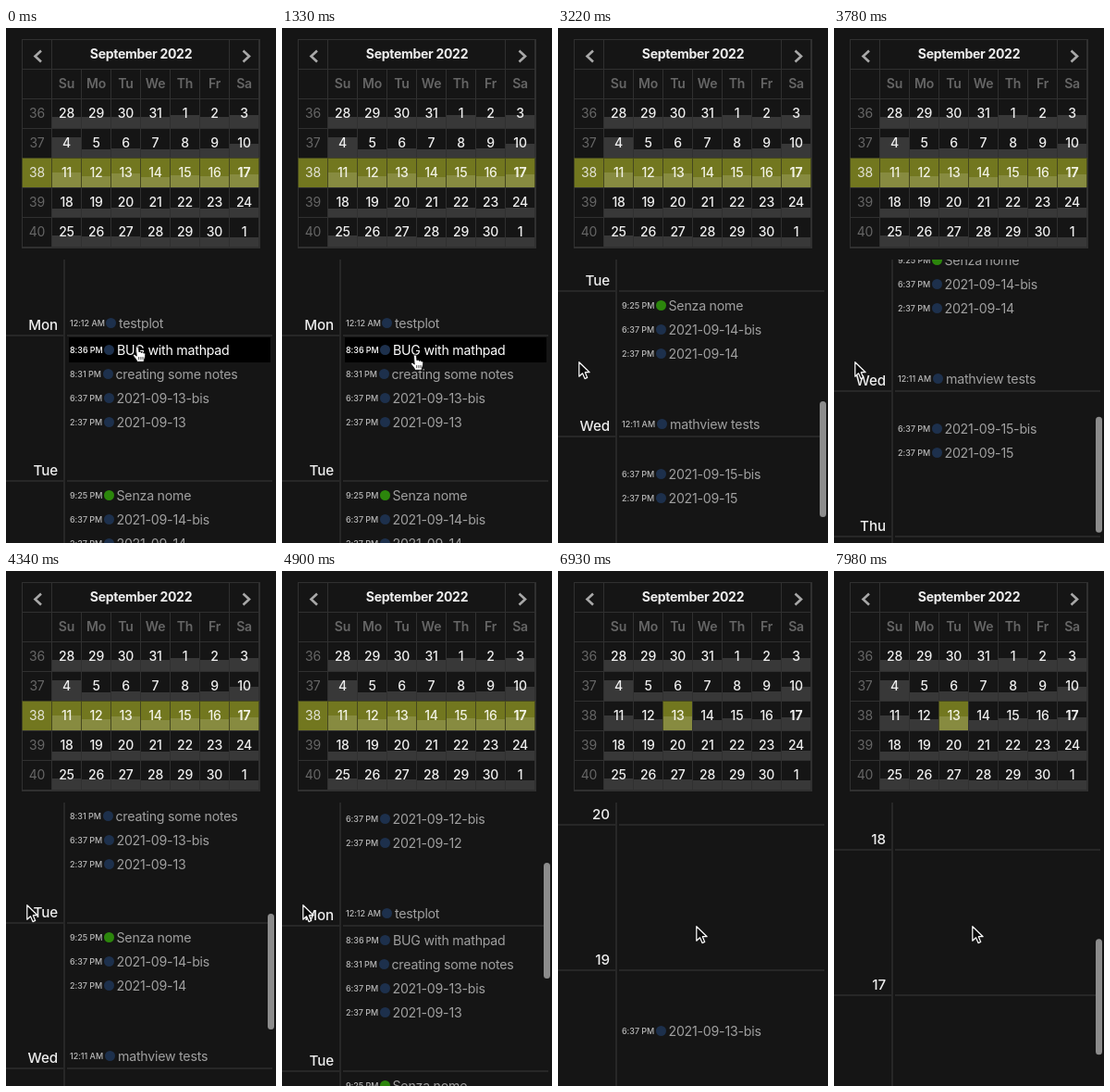
An HTML page that plays this animation: 292 by 556 pixels, repeating every 8000 ms.

```html
<!DOCTYPE html>
<html lang="en">
<head>
<meta charset="utf-8">
<title>Calendar timeline</title>
<style>
  html, body { margin: 0; width: 100%; height: 100%; overflow: hidden; background: #151515; }
  body { position: relative; font: 400 14px/20px Inter, "Open Sans", sans-serif; color: #eee; }
  div, span, svg { position: absolute; white-space: nowrap; box-sizing: border-box; }

  #cal { left: 17px; top: 12px; width: 258px; height: 226px; border: 1px solid #303030; }
  .cell { width: 33px; height: 33px; line-height: 30.5px; text-align: center; font-weight: 500; letter-spacing: -.2px; border: 1px solid #303030; }
  .cell span { left: 0; right: 0; top: 0; }
  .bar { left: 0; right: 0; bottom: 0; background: rgba(255, 255, 255, .15); }
  .dim { color: #666; font-weight: 400; }
  .head { font-weight: 600; color: #666; }
  .today { font-weight: 700; }
  .on { background: #72771f; border-color: #45471f; color: #f2f2e4; }
  .on.dim { color: #e4e4d8; }
  #month { left: 50px; top: 12px; width: 192px; height: 33px; line-height: 32px; text-align: center; font-weight: 700; letter-spacing: -.3px; }

  #view { left: 0; top: 250px; width: 292px; bottom: 0; overflow: hidden; }
  #axis { left: 62px; top: 0; bottom: 0; width: 2px; background: #272727; }
  #list { left: 0; top: -250px; width: 292px; height: 0; }
  .rule { height: 2px; background: #272727; }
  .label { right: 236px; font-size: 15.2px; font-weight: 500; letter-spacing: -.1px; color: #eee; }
  .row { left: 68px; width: 218px; height: 27px; line-height: 27px; color: #a0a0a0; }
  .row .time { left: 1px; font-size: 9px; font-weight: 500; letter-spacing: -.05px; color: #b8b8b8; }
  .row .dot { top: 8px; width: 11px; height: 11px; border-radius: 50%; background: #1d304c; }
  .row .dot.green { background: #2c860c; }
  .row .name { font-size: 14.2px; letter-spacing: -.24px; }
  .row.hover { background: #000; }
  .row.hover .name, .row.hover .time { color: #fff; }

  #thumb { left: 283px; top: 0; width: 7px; height: 125px; border-radius: 4px; background: #8c8c8c; }
  #arrow, #hand { left: 0; top: 0; overflow: visible; }
</style>
</head>
<body>
<div id="cal"></div>
<div id="grid"></div>
<div id="month">September 2022</div>
<svg width="292" height="50" fill="none" stroke="#a8a8a8" stroke-width="2.6">
  <path d="M38 24.500 31.500 30.500l6.500 6M256.500 24.500 263 30.500l-6.500 6"/>
</svg>

<div id="view">
  <div id="axis"></div>
  <div id="list"></div>
</div>
<div id="thumb"></div>

<svg id="arrow" width="14" height="20">
  <path d="M.5.7V16.200L4.200 12.800 6.700 18.600 9.400 17.400 7 11.700H11.800Z" fill="#0a0a0a" stroke="#fff" stroke-width="1.200" stroke-linejoin="round"/>
</svg>
<svg id="hand" width="18" height="20">
  <path d="M-1.500 1.200C-1.500-.6 1.300-.6 1.400 1.200L2 6C2.400 4.900 4.300 5 4.500 6.500 5 5.500 6.700 5.800 6.900 7.200 7.500 6.600 8.700 7 8.700 8.300 8.800 11.500 7.600 12.800 7 16.300H-.2C-.6 14-2.600 12.300-4.100 10.200-5 8.800-3.300 7.600-2 9L-.8 10.200Z" fill="#fff" stroke="#111" stroke-width=".9" stroke-linejoin="round"/>
  <path d="M1.700 11v3.200M3.900 11v3.200M6 11v3.200" stroke="#222" stroke-width=".8"/>
</svg>

<script>
const LOOP = 8000, TICK = 70, PICK = 6090;
const $ = id => document.getElementById(id);
const px = n => n + 'px';

function add(parent, cls, text, css, tag = 'div') {
  const el = document.createElement(tag);
  el.className = cls;
  el.textContent = text;
  Object.assign(el.style, css);
  parent.append(el);
  return el;
}

// Calendar
const grid = $('grid');
function cell(col, row, cls, text, load = 0) {
  const el = add(grid, 'cell ' + cls, '', { left: px(17 + col * 32), top: px(12 + row * 32) });
  if (load) add(el, 'bar', '', { height: px(load) });
  add(el, '', text, {}, 'span');
  return el;
}
cell(0, 0, '', '');
cell(7, 0, '', '');
['', 'Su', 'Mo', 'Tu', 'We', 'Th', 'Fr', 'Sa'].forEach((d, i) => cell(i, 1, 'head', d));

const loads = [
  [12, 12, 12, 12, 14, 12, 14],
  [22, 9, 10, 9, 9, 10, 15],
  [16, 12, 15, 11, 13, 12, 14],
  [9, 9, 10, 9, 10, 9, 10],
  [12, 11, 11, 10, 10, 10, 10]
];
const week = [];
loads.forEach((heights, r) => {
  const cells = [cell(0, r + 2, 'dim', 36 + r)];
  heights.forEach((h, c) => {
    const n = r * 7 + c - 3;
    const day = n < 1 ? n + 31 : n > 30 ? n - 30 : n;
    cells.push(cell(c + 1, r + 2, n === 17 ? 'today' : '', day, h));
  });
  if (r === 2) week.push(...cells);
});

// Timeline
const list = $('list');
const days = ['Sun', 'Mon', 'Tue', 'Wed', 'Thu', 'Fri', 'Sat'];
const labels = days.map((d, i) => {
  const y = 175 + i * 157;
  add(list, 'rule', '', { left: 0, width: '62px', top: px(y - 1) });
  add(list, 'rule', '', { left: '66px', width: '222px', top: px(y - 1) });
  return add(list, 'label', d, { top: px(y - 21.500) });
});

function entry(y, time, x, name, green) {
  const el = add(list, 'row', '', { top: px(y - 14) });
  add(el, 'time', time);
  add(el, 'dot' + (green ? ' green' : ''), '', { left: px(x - 81.700) });
  add(el, 'name', name, { left: px(x - 68) });
  return el;
}
const weekRows = [
  [217, '6:37 PM', 119.500, '2021-09-12-bis'],
  [243, '2:37 PM', 119.500, '2021-09-12'],
  [319, '12:12 AM', 122, 'testplot'],
  [348, '8:36 PM', 120, 'BUG with mathpad'],
  [374, '8:31 PM', 118.500, 'creating some notes'],
  [400, '6:37 PM', 119.500, '2021-09-13-bis'],
  [426, '2:37 PM', 119.500, '2021-09-13'],
  [505, '9:25 PM', 119.500, 'Senza nome', true],
  [531, '6:37 PM', 119.500, '2021-09-14-bis'],
  [557, '2:37 PM', 119.500, '2021-09-14'],
  [633, '12:11 AM', 121, 'mathview tests'],
  [687, '6:37 PM', 119.500, '2021-09-15-bis'],
  [713, '2:37 PM', 119.500, '2021-09-15']
].map(r => entry(...r));
const bug = weekRows[3];
const dayRow = entry(398, '6:37 PM', 119.500, '2021-09-13-bis');

// Motion: [time, value...]
const scrollKeys = [[2730, 0], [3220, -205], [3640, -265], [4340, -109], [4900, 51], [5250, 99], [7210, 99], [7980, -188]];
const mouseKeys = [
  [0, 142, 344], [350, 147, 348], [700, 151, 354], [1330, 144, 353], [2100, 144, 353],
  [2450, 22.300, 360], [4900, 22.300, 360], [5320, 116, 166], [5740, 125, 151], [5880, 126, 150],
  [6440, 126, 150], [6650, 128, 154], [6930, 149.300, 383]
];

// Smooth curve through the keys, flat at turning points and ends
function sample(keys, t, k = 1) {
  const last = keys.length - 1;
  if (t <= keys[0][0]) return keys[0][k];
  if (t >= keys[last][0]) return keys[last][k];
  const i = keys.findIndex(p => p[0] > t) - 1;
  const slope = j => {
    if (j === 0 || j === last) return 0;
    const [a, b, c] = [keys[j - 1], keys[j], keys[j + 1]];
    return (b[k] - a[k]) * (c[k] - b[k]) <= 0 ? 0 : (c[k] - a[k]) / (c[0] - a[0]);
  };
  const [a, b] = [keys[i], keys[i + 1]];
  const d = b[0] - a[0], u = (t - a[0]) / d, v = 1 - u;
  return a[k] * v * v * (1 + 2 * u) + b[k] * u * u * (3 - 2 * u)
    + d * u * v * (slope(i) * v - slope(i + 1) * u);
}

function thumbAlpha(t) {
  if (t < 2800 || (t >= 5740 && t < 7280)) return 0;
  return t > 5250 && t < 5740 ? 1 - (t - 5250) / 490 : 1;
}

function draw(t) {
  const picked = t >= PICK;
  const scroll = Math.round(sample(scrollKeys, t));
  const x = sample(mouseKeys, t, 1), y = sample(mouseKeys, t, 2);
  const show = (el, on) => { el.style.visibility = on ? 'visible' : 'hidden'; };

  list.style.transform = `translateY(${scroll}px)`;
  labels.forEach((el, i) => { el.textContent = picked ? 20 - i : days[i]; });
  weekRows.forEach(el => show(el, !picked));
  show(dayRow, picked);
  week.forEach((el, i) => el.classList.toggle('on', !picked || i === 3));

  const hover = t < 2450 && x > 66;
  bug.classList.toggle('hover', hover);
  const hand = hover || (y > 77 && y < 237 && x > 50);
  show($('hand'), hand);
  show($('arrow'), !hand);
  $(hand ? 'hand' : 'arrow').style.transform = `translate(${x}px, ${y}px)`;

  $('thumb').style.transform = `translateY(${403 - (scroll + 205) * .344}px)`;
  $('thumb').style.opacity = thumbAlpha(t);
}

const start = performance.now();
function frame() {
  const t = (performance.now() - start) % LOOP;
  draw(Math.floor(t / TICK) * TICK);
  requestAnimationFrame(frame);
}
frame();
</script>
</body>
</html>
```
